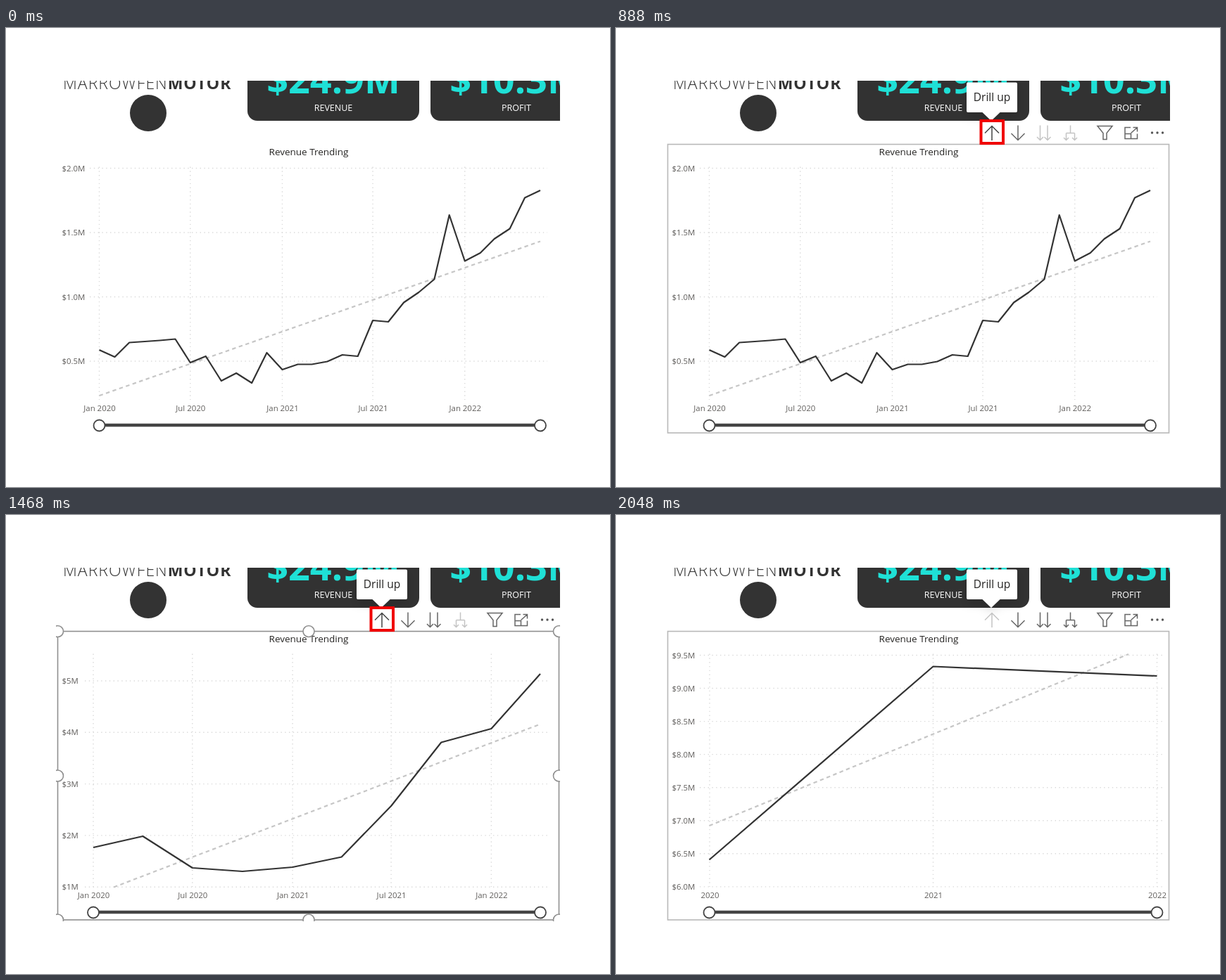
An HTML page for the animation above (2280 ms loop, 858 by 653 pixels).

```html
<!DOCTYPE html>
<html lang="en">
<head>
<meta charset="utf-8">
<title>Drill up a line chart</title>
<style>
html, body { margin: 0; width: 100%; height: 100%; overflow: hidden; background: #fff; }
svg { display: block; width: 858px; height: 653px; font-family: "Open Sans", "Noto Sans", sans-serif; }
.mid { text-anchor: middle; }
.axis { font-size: 11.4px; fill: #605e5c; }
.grid { stroke: #dadada; stroke-width: 1.4; stroke-dasharray: 1.4 4.4; }
.trend { stroke: #c6c6c6; stroke-width: 2.2; stroke-dasharray: 5.5 4.5; }
.data { fill: none; stroke: #333; stroke-width: 2.2; stroke-linejoin: round; }
.icon { fill: none; stroke-width: 1.5; }
</style>
</head>
<body>
<svg viewBox="0 0 858 653">
  <defs>
    <clipPath id="view"><rect x="71" y="75" width="716" height="503"/></clipPath>
    <filter id="soft" x="-60%" y="-60%" width="220%" height="240%">
      <feDropShadow dx="0" dy="6" stdDeviation="7" flood-opacity=".14"/>
    </filter>
  </defs>
  <g clip-path="url(#view)">
    <g id="header"></g>
    <g id="chart"></g>
    <g id="tools"></g>
  </g>
</svg>
<script>
const $ = id => document.getElementById(id);
const line = (cls, x1, y1, x2, y2) =>
  `<line class="${cls}" x1="${x1}" y1="${y1}" x2="${x2}" y2="${y2}"/>`;
const text = (s, x, y, attrs) => `<text x="${x}" y="${y}" ${attrs}>${s}</text>`;
const ring = (x, y, stroke, width) =>
  `<circle cx="${x}" cy="${y}" r="8" fill="#fff" stroke="${stroke}" stroke-width="${width}"/>`;

const DAY = 864e5;
const day = month => (Date.UTC(2020, month, 1) - Date.UTC(2020, 0, 1)) / DAY;
const halfYears = ["Jan 2020", "Jul 2020", "Jan 2021", "Jul 2021", "Jan 2022"];

// Horizontal position of a month, between the first and last point
const scale = (x0, x1, last) => month => x0 + (x1 - x0) * day(month) / day(last);

function series(x0, x1, gap, ys) {
  const at = scale(x0, x1, gap * (ys.length - 1));
  return {
    x0, x1,
    points: ys.map((y, i) => [at(i * gap), y]),
    ticks: halfYears.map((label, i) => [label, at(i * 6)])
  };
}

const levels = (n, y, step, value, drop, digits) =>
  Array.from({ length: n }, (_, i) => [`$${(value - i * drop).toFixed(digits)}M`, y + i * step]);

const monthly = {
  ...series(132.5, 759, 1, [
    458, 468, 447.5, 446, 444.5, 442.5, 476, 467, 502, 491,
    505, 462, 486, 478.5, 478.5, 474.5, 465, 467, 416, 418,
    390.5, 376, 357.5, 266, 331.5, 320, 300, 285.5, 241.5, 231]),
  rows: levels(4, 199.5, 91.5, 2, .5, 1),
  left: 119, right: 769,
  trend: [132.5, 523, 759, 303.5]
};
const quarterly = {
  ...series(124, 759, 3, [473, 457, 502, 507, 501, 486.5, 414, 323.5, 304, 226]),
  rows: levels(5, 236, 73.3, 5, 1, 0),
  left: 112, right: 769,
  trend: [153, 529.5, 759, 297.5]
};
const yearly = {
  x0: 132.5, x1: 768.5,
  points: [[132.5, 490.5], [450.5, 215.5], [768.5, 229]],
  ticks: [["2020", 133], ["2021", 450.5], ["2022", 768.5]],
  rows: levels(8, 199.5, 47.05, 9.5, .5, 1),
  left: 119, right: 780,
  trend: [132.5, 442, 728, 198]
};

const states = [
  { until: 540, chart: monthly },
  { until: 1120, chart: monthly, tools: true, up: true },
  { until: 1700, chart: quarterly, tools: true, up: true, pairs: true, handles: true },
  { until: 2280, chart: yearly, tools: true, pairs: true, fork: true }
];

function card(x, value, label) {
  const mid = x + 122;
  return `<rect x="${x}" y="40" width="244" height="92" rx="14" fill="#323232"/>` +
    text(value, mid, 92.5, 'class="mid" font-size="54" font-weight="700" fill="#1fe0d6"') +
    text(label, mid, 118, 'class="mid" font-size="12.5" fill="#fff"');
}

function header() {
  const mark = 'font-size="23" letter-spacing="1" fill="#333"';
  return '<circle cx="202" cy="121" r="26" fill="#333"/>' +
    text('MARROWFEN<tspan font-weight="700">MOTOR</tspan>', 81, 87, mark + ' font-weight="300"') +
    card(343, "$24.9M", "REVENUE") + card(603, "$10.3M", "PROFIT");
}

function plot(c) {
  const rows = c.rows.map(([label, y]) =>
    line("grid", c.left, y, c.right, y) + text(label, 79.5, y + 4, 'class="axis"'));
  const cols = c.ticks.map(([label, x]) =>
    line("grid", x, 197.5, x, 529) + text(label, x + .5, 544.5, 'class="axis mid"'));
  return rows.join("") + cols.join("") +
    line("trend", ...c.trend) +
    `<polyline class="data" points="${c.points.join(" ")}"/>` +
    `<line x1="${c.x0}" y1="565" x2="${c.x1}" y2="565" stroke="#444" stroke-width="4.5"/>` +
    ring(c.x0, 565.5, "#444", 1.8) + ring(c.x1, 565.5, "#444", 1.8) +
    text("Revenue Trending", 430, 181, 'class="mid" font-size="13.5" fill="#252423"');
}

function frame(s) {
  const tone = s.handles ? "#8f8f8f" : "#b8b8b8";
  let out = `<rect x="73.5" y="165.5" width="712" height="410.5" fill="none" stroke="${tone}" stroke-width="1.6"/>`;
  if (s.handles) {
    for (const x of [73.5, 430, 785.5])
      for (const y of [165.5, 371, 576])
        if (x !== 430 || y !== 371) out += ring(x, y, tone, 1.6);
  }
  return out;
}

const icon = (d, tone = "#666") => `<path class="icon" d="${d}" stroke="${tone}"/>`;
const toggle = (d, on, tone) => icon(d, on ? tone : "#c4c4c4");
const arrowDown = (x, top, end, w) =>
  `M${x} ${top}V${end}M${x - w} ${end - w}L${x} ${end}L${x + w} ${end - w}`;

function tools(s) {
  const dots = [761.5, 769, 776.5].map(x => `<circle cx="${x}" cy="149" r="1.7" fill="#555"/>`);
  const box = s.up
    ? '<rect x="518.5" y="132" width="31.5" height="32" fill="#fff" stroke="#f00000" stroke-width="4"/>' : "";
  return '<g filter="url(#soft)"><path d="M500 77.5H568Q570 77.5 570 79.5V118Q570 120 568 120H545.5L533 132L520.5 120H500Q498 120 498 118V79.5Q498 77.5 500 77.5Z" fill="#fff"/></g>' +
    text("Drill up", 534, 104, 'class="mid" font-size="15.5" fill="#252423"') +
    box +
    toggle("M534 160V139.5M524 149.5L534 139.5L544 149.5", s.up, "#444") +
    icon(arrowDown(571, 138.5, 159.5, 9.5)) +
    toggle(arrowDown(602.5, 138.5, 159.5, 4.5) + arrowDown(613, 138.5, 159.5, 4.5), s.pairs) +
    toggle("M645.5 138.5V149.5M639.5 149.5H651.5" +
      arrowDown(639.5, 149.5, 159.5, 3.5) + arrowDown(651.5, 149.5, 159.5, 3.5), s.fork) +
    icon("M684 139.5H705L697 149.5V158.5H692V149.5Z") +
    icon("M731 141.5H723V157.5H740.5V150.5M723 150.5H731.5V157.5M731.5 149.5L740.5 141.5M734.5 141.5H740.5V147.5") +
    dots.join("");
}

let shown = -1;
function draw(now) {
  const t = now % 2280;
  const k = states.findIndex(s => t < s.until);
  if (k !== shown) {
    const s = states[shown = k];
    $("chart").innerHTML = plot(s.chart) + (s.tools ? frame(s) : "");
    $("tools").innerHTML = s.tools ? tools(s) : "";
  }
}

$("header").innerHTML = header();
const start = performance.now();
function tick() {
  draw(performance.now() - start);
  requestAnimationFrame(tick);
}
tick();
</script>
</body>
</html>
```
